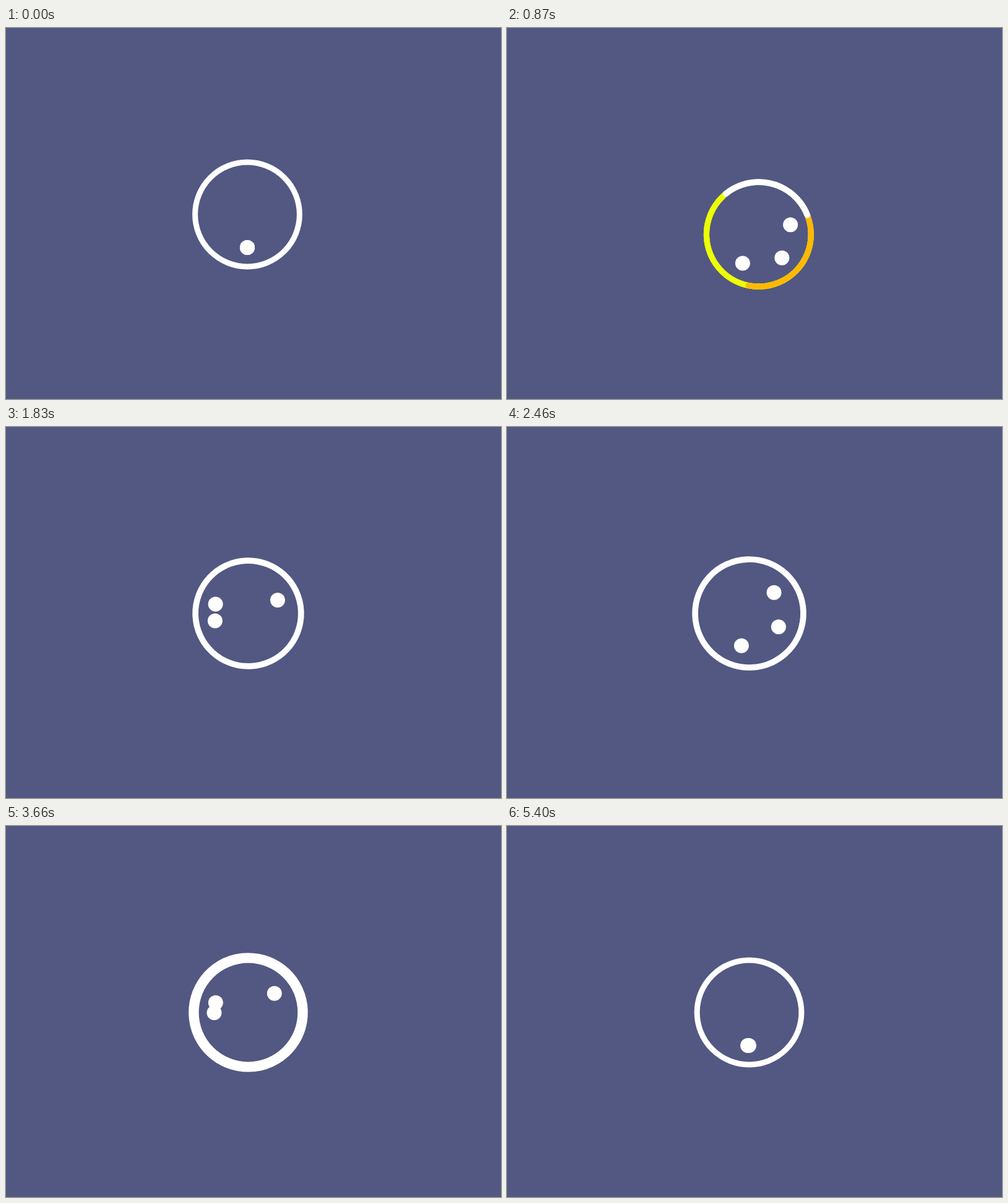
An HTML page with a canvas for the animation above (5.7 s loop, 800 by 600 pixels).

```html
<!DOCTYPE html>
<html>
<head>
<meta charset="utf-8">
<style>
html, body { margin: 0; width: 100%; height: 100%; overflow: hidden; background: #525882; }
canvas { display: block; }
</style>
</head>
<body>
<canvas id="stage" width="800" height="600"></canvas>
<script>
const ctx = document.getElementById('stage').getContext('2d');
const LOOP = 5700, END = 5400, STEP = 30, TAU = 2 * Math.PI, RAD = TAU / 360;
const COLORS = ['#aee612', '#edff00', '#ffb900', '#fff'];

// Time and angle of each dot; all make ten turns from the bottom to the bottom
const DOT_KEYS = [
  [0, 90, 90, 90], [480, 429, 230, 94], [1230, 963, 756, 746],
  [2460, 1902, 1824, 1761], [3660, 2845, 2717, 2699.5],
  [4650, 3368, 3338.6, 3300.4], [END, 3691, 3690, 3689]
];

const clamp = x => Math.min(1, Math.max(0, x));
const ease = u => (1 - Math.cos(Math.PI * clamp(u))) / 2;
const wave = (t, period) => Math.sin(TAU * t / period);

// Smooth curve through the keys, at rest at both ends
function sample(keys, t, col) {
  const last = keys.length - 1;
  if (t >= keys[last][0]) return keys[last][col];
  const i = keys.findIndex(k => k[0] > t) - 1;
  const slope = j => j === 0 || j === last ? 0 :
    (keys[j + 1][col] - keys[j - 1][col]) / (keys[j + 1][0] - keys[j - 1][0]);
  const [a, b] = [keys[i], keys[i + 1]], d = b[0] - a[0], u = (t - a[0]) / d;
  return a[col] + (b[col] - a[col]) * u * u * (3 - 2 * u)
    + d * u * (1 - u) * (slope(i) * (1 - u) - slope(i + 1) * u);
}

function arc(x, y, r, width, color, from = 0, length = 360) {
  ctx.beginPath();
  ctx.arc(x, y, r, from * RAD, (from + length) * RAD);
  ctx.lineWidth = width;
  ctx.strokeStyle = color;
  ctx.stroke();
}

function draw(t) {
  ctx.fillStyle = '#525882';
  ctx.fillRect(0, 0, 800, 600);
  ctx.lineCap = 'round';

  // The whole loader shakes, strongest halfway
  const shake = Math.sin(Math.PI * clamp(t / 1710));
  const x = 390 + shake * 33 * wave(t, 615);
  const y = 301.5 + shake * (47 * wave(t, 748) - 8);
  const ringX = x + 1.5 * clamp((t - 1230) / 570);
  if (t < 1400 || t >= 3000) arc(ringX, y, 84.4, 9, '#fff');

  // Each stroke grows while it turns, later runs back the same way
  const leaving = t > 3000;
  const origin = leaving ? 212 : 120, turn = leaving ? 360 : 373;
  const amount = i => leaving
    ? 1 - ease((t - 3995 - 74 * i) / 900)
    : ease((t - 339 - 84 * i) / 759);
  const radius = Math.min(93.3, Math.max(84.5, 87.5 + (t - 2460) / 300));
  COLORS.forEach((color, i) => {
    const p = amount(i), top = i === COLORS.length - 1;
    if (p > 0 && (top || amount(COLORS.length - 1) < 1))
      arc(ringX, y, radius, top ? 9.7 : 9.2, color, origin + turn * p, 360 * p);
  });

  ctx.fillStyle = '#fff';
  for (let col = 1; col <= 3; col++) {
    const a = sample(DOT_KEYS, t, col) * RAD;
    ctx.beginPath();
    ctx.arc(x + 53.5 * Math.cos(a), y + 53.5 * Math.sin(a), 12, 0, TAU);
    ctx.fill();
  }
}

const start = performance.now();
function frame() {
  const t = (performance.now() - start) % LOOP;
  draw(Math.min(END, Math.floor(t / STEP) * STEP));
  requestAnimationFrame(frame);
}
frame();
</script>
</body>
</html>
```
